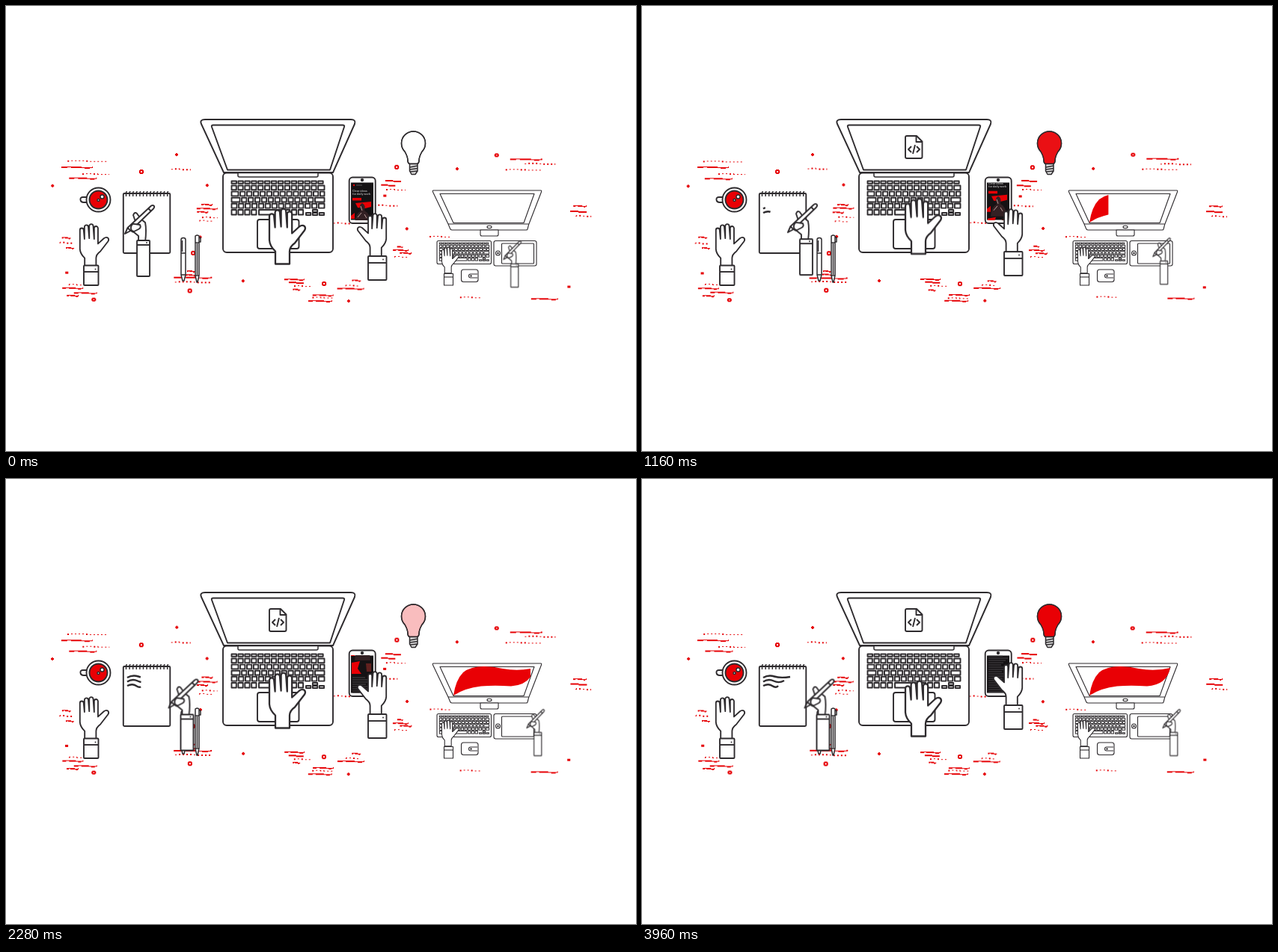
Recreate the animation shown at these times as an HTML page. Size 842 by 596 pixels, loop 4 s.

```html
<!DOCTYPE html>
<html lang="en">
<head>
<meta charset="utf-8">
<title>Busy desk</title>
<style>
html, body { margin: 0; width: 100%; height: 100%; overflow: hidden; background: #fff; }
svg { display: block; width: 842px; height: 596px; }
.ink { fill: #fff; stroke: #2e2b2e; stroke-width: 1.9; stroke-linejoin: round; }
.bold { stroke-width: 2.3; }
.thin { stroke-width: 1.1; }
.fine { stroke-width: 1.5; }
.line { fill: none; }
.dark { fill: #2e2b2e; stroke: none; }
.red { fill: #e90005; stroke: none; }
.mark { fill: none; stroke: #e60005; stroke-width: 1.9; shape-rendering: crispEdges; animation: wobble .8s linear infinite; }
.dots { stroke-width: 1.5; stroke-dasharray: 2 3; }
.spot { fill: #e60005; stroke: none; }

.move { animation: 4s linear infinite; }
.typing { animation-name: typing; }
.writing { animation-name: writing; }
.swiping { animation-name: swiping; }
.drawing { animation-name: drawing; }
.page { animation-name: page; }
.glow { animation-name: glow; }
.icon { animation-name: icon; }
.reveal { animation-name: reveal; }
.note { fill: none; stroke: #2e2b2e; stroke-width: 2.4; stroke-dasharray: 1 2; }
.note1 { animation-name: note1; }
.note2 { animation-name: note2; }
.note3 { animation-name: note3; }

@keyframes wobble {
  0%, 100% { transform: translate(0, 0); }
  30% { transform: translate(.4px, -.5px); }
  65% { transform: translate(-.4px, .5px); }
}
@keyframes typing {
  0%, 100% { transform: translateY(0); }
  22% { transform: translateY(-9px); }
  35%, 45% { transform: translateY(-17.5px); }
  57% { transform: translateY(-12px); }
  73% { transform: translateY(-3px); }
  99% { transform: translateY(-1px); }
}
@keyframes writing {
  0% { transform: translate(0, 0); }
  22% { transform: translate(27px, -4px); }
  35% { transform: translate(43.5px, 0); }
  45% { transform: translate(55px, -4px); }
  48%, 100% { transform: translate(58.5px, 1.5px); }
}
@keyframes swiping {
  0%, 22% { transform: translateY(0); }
  35% { transform: translateY(-11px); }
  45% { transform: translateY(-19px); }
  57% { transform: translateY(-20px); }
  73% { transform: translateY(-25px); }
  99%, 100% { transform: translateY(-32px); }
}
@keyframes drawing {
  0% { transform: translate(0, 0); }
  22% { transform: translate(9.5px, -5px); }
  35% { transform: translate(25px, -3px); }
  45%, 100% { transform: translate(31px, -6px); }
}
@keyframes page {
  0%, 22% { transform: translateY(0); }
  35% { transform: translateY(-17px); }
  45% { transform: translateY(-30px); }
  57% { transform: translateY(-48px); }
  73% { transform: translateY(-71px); }
  99%, 100% { transform: translateY(-95px); }
}
@keyframes glow {
  0% { fill-opacity: 0; }
  31%, 40% { fill-opacity: 1; }
  45% { fill-opacity: .8; }
  57% { fill-opacity: .26; }
  65%, 70% { fill-opacity: 0; }
  73% { fill-opacity: .08; }
  99%, 100% { fill-opacity: 1; }
}
@keyframes icon { 0%, 11% { opacity: 0; } 16%, 100% { opacity: 1; } }
@keyframes reveal {
  0%, 19.5% { transform: translateX(-110px); }
  22% { transform: translateX(-103px); }
  35% { transform: translateX(-69px); }
  45% { transform: translateX(-36px); }
  57% { transform: translateX(-7px); }
  60%, 100% { transform: translateX(0); }
}
@keyframes note1 {
  0%, 38% { stroke-dashoffset: 1; }
  45% { stroke-dashoffset: .67; }
  57% { stroke-dashoffset: .49; }
  70%, 100% { stroke-dashoffset: 0; }
}
@keyframes note2 {
  0%, 27% { stroke-dashoffset: 1; }
  35% { stroke-dashoffset: .6; }
  57% { stroke-dashoffset: .34; }
  70%, 100% { stroke-dashoffset: 0; }
}
@keyframes note3 {
  0%, 17% { stroke-dashoffset: 1; }
  22% { stroke-dashoffset: .7; }
  35%, 45% { stroke-dashoffset: .4; }
  57% { stroke-dashoffset: .1; }
  66%, 100% { stroke-dashoffset: 0; }
}
</style>
</head>
<body>
<svg viewBox="0 0 842 596">
  <defs>
    <path id="hand" class="ink bold" d="M1 10a3.1 3.1 0 0 1 6.2 0L8.600 25V5a3.2 3.2 0 0 1 6.400 0L16.600 24V3.500a3.3 3.3 0 0 1 6.600 0L24.800 25V7a3.2 3.2 0 0 1 6.400 0V33L41 24Q45 21 48 23.500Q50 26 48 29L35 46Q28 51 28 57V74H9V57Q1.500 50 1 42Z"/>
    <g id="penHand" class="ink">
      <path d="M18 11V3L12-2Q5-4 8-10L14-16 11-25Q13-30 16-27L21-20 27-15Q29-5 27 11Z"/>
      <path d="M0 0L3.500-8 34.500-37Q37-39 38.500-37.500 40-36 38-33.500L7.500-4Z"/>
      <path class="line" d="M3.500-8L7.500-4M31-34L35-30"/>
      <path d="M8-9Q9-14 13-13L20-12Q22-8 18-6L12-3Q7-4 8-9Z"/>
      <rect x="16" y="9" width="17" height="48" rx="1"/>
      <path class="line" d="M16 15H33"/>
      <circle class="dark" cx="29" cy="12" r="1"/>
    </g>
    <path id="keys" class="ink"/>
    <path id="bulb" d="M537 207Q537 202 533 195A16 16 0 1 1 556 195Q552 202 552 207Q552 211 549 211.500H540Q537 211 537 207Z"/>
    <clipPath id="screen"><rect x="461" y="236.500" width="30" height="50"/></clipPath>
    <clipPath id="sweep"><rect class="move reveal" x="597" y="245" width="111" height="50"/></clipPath>
  </defs>

  <g id="marks"></g>

  <!-- cup and notepad -->
  <g class="ink">
    <path d="M110 256H103Q99 256 99.500 259.500 100 263 104 263H110Z"/>
    <circle cx="123.500" cy="259.500" r="16"/>
    <circle cx="123.500" cy="259.500" r="12" style="fill:#e90005"/>
    <circle class="fine" cx="128.500" cy="255.500" r="2.500"/>
    <circle class="fine" cx="123.500" cy="260" r="1.500"/>
    <rect x="156.800" y="251" width="62.500" height="80" rx="1.500"/>
    <path id="spiral" class="line fine"/>
  </g>
  <path class="move note note1" pathLength="1" d="M162 266Q169 262 177 264.500T198 265"/>
  <path class="move note note2" pathLength="1" d="M162 271.500Q169 267 176 270.500T190 270"/>
  <path class="move note note3" pathLength="1" d="M162 277Q169 273.500 174 277T182 277"/>

  <!-- pens -->
  <g class="ink fine">
    <path d="M234 313Q234 310.500 237 310.500T240 313V360L238 368H236L234 360Z"/>
    <path class="line" d="M234 331H240M234 360H240M235.500 314V329"/>
    <path d="M253 308Q255.500 306 258 308V361L256 370H255L253 361Z"/>
    <path class="line" d="M253 317H258M253 361H258M255.500 318V360M258 310H260V316H258"/>
  </g>

  <!-- laptop -->
  <g class="ink">
    <path d="M266 152H461Q468 152 466 158L437 223H291L261 158Q258.500 152 266 152Z"/>
    <path d="M277 159.500H450Q453 159.500 452 162L433 219.500H296L275 162Q274 159.500 277 159.500Z"/>
    <rect x="290" y="223.500" width="147" height="106.500" rx="5"/>
    <path class="fine" d="M310 223.500V227Q310 229 312 229H415Q417 229 417 227V223.500Z"/>
    <use href="#keys"/>
    <rect x="336" y="286" width="55.500" height="39" rx="3"/>
    <g class="move icon">
      <path d="M354 174H367L374.500 181.500V202Q374.500 204 372.500 204H354Q352 204 352 202V176Q352 174 354 174Z"/>
      <path class="line" d="M366.500 174V182H374.500M360 188L356 192 360 196M367 188L371 192 367 196M365 186L362 198"/>
    </g>
  </g>
  <g class="move typing"><use href="#hand" x="351" y="271.500"/></g>

  <!-- phone -->
  <rect class="ink" x="458.700" y="229.500" width="35" height="61.500" rx="4.500"/>
  <circle class="dark" cx="476" cy="233" r="2.200"/>
  <rect fill="#151214" x="461" y="236.500" width="30" height="50"/>
  <g clip-path="url(#screen)">
    <g class="move page">
      <circle class="red" cx="465" cy="240" r="1.200"/>
      <path stroke="#777" stroke-width=".7" d="M468 240H476"/>
      <text x="463" y="248.500" font-family="Roboto, sans-serif" font-size="4" fill="#ddd">Clear ideas<tspan x="463" dy="4">for daily work</tspan></text>
      <path class="red" d="M463 257H475V260.500H463ZM467 264L488 262V269L480 271 470 270ZM461 281L466 277V285H461Z"/>
      <path fill="#332023" d="M466 291Q467 277 474 275Q471 266 476 264 481 266 479 274 487 278 487 291Z"/>
      <path stroke="#bb9d9b" d="M474 268L476 274M470 283L475 277M479 279L482 284"/>
      <path class="red" d="M462 294L473 292 470 302 475 309H462Z"/>
      <path fill="#61211f" d="M481 295H488V306H482Z"/>
      <path id="lines" stroke="#504c4e" stroke-width=".9"/>
    </g>
  </g>

  <!-- bulb -->
  <use href="#bulb" class="ink fine"/>
  <use href="#bulb" class="red move glow"/>
  <use href="#bulb" class="ink fine line"/>
  <path class="ink fine" style="fill:#ddd" d="M539.500 211.500H550V221L547 225.500H542L539.500 221Z"/>
  <path class="ink line fine" d="M539.500 216L550 214M539.500 219L550 217.500M540 222L550 221"/>

  <!-- desktop computer -->
  <g class="ink thin">
    <path d="M571 247H715Q716 247 715.500 249L698.500 293 697 299Q697 300 695 300H596Q594 300 593.500 298L591 292 570.500 249Q570 247 571 247Z"/>
    <path d="M580 251.500H706L692 290.500H598Z"/>
    <path class="line" d="M591 292H698.500"/>
    <ellipse cx="646" cy="296" rx="3" ry="1.700"/>
    <path d="M634 300H658V306Q658 308 656 308H636Q634 308 634 306Z"/>
    <rect x="576" y="314.500" width="72.500" height="31" rx="2"/>
    <use href="#keys" transform="translate(418 191.500) scale(.535)"/>
    <rect x="652" y="314.500" width="57" height="33.500" rx="2.500"/>
    <rect x="662.500" y="318" width="43" height="27" rx="1"/>
    <circle cx="657.500" cy="331" r="3"/>
    <circle class="dark" cx="657.500" cy="331" r="1.300"/>
    <rect x="608.500" y="353" width="22.500" height="16.500" rx="3"/>
    <path d="M630 359H621Q618.500 359 618.500 361.500T621 364H630"/>
    <circle class="dark" cx="621.500" cy="361.500" r="1.200"/>
  </g>
  <path class="red" clip-path="url(#sweep)" d="M598 290Q601 269 611 259 621 251 639 251 651 251 664 254 685 258 706 253 701 276 675 277.500 653 276 635 277.500 613 280 598 290Z"/>

  <!-- hands -->
  <use href="#hand" transform="translate(98 292) scale(.8)"/>
  <g class="ink">
    <rect x="104" y="347.500" width="19.500" height="26.500" rx="1"/>
    <path class="line" d="M104 356H123.500"/>
    <circle class="dark" cx="119.500" cy="352.500" r=".9"/>
  </g>
  <g class="move writing"><use href="#penHand" x="159" y="305"/></g>
  <g class="move swiping">
    <use href="#hand" transform="translate(509 278) scale(-.8 .8)"/>
    <g class="ink">
      <rect x="484" y="335" width="24.500" height="32" rx="1"/>
      <path class="line" d="M484 344H508.500"/>
      <circle class="dark" cx="504" cy="339.500" r=".9"/>
    </g>
  </g>
  <use href="#hand" transform="translate(582 323) scale(.47)"/>
  <g class="ink thin">
    <rect x="585.500" y="358.500" width="12" height="15.500"/>
    <path class="line" d="M585.500 363H597.500"/>
  </g>
  <g class="move drawing"><use href="#penHand" transform="translate(665 339.500) scale(.6 .65)"/></g>
</svg>

<script>
const marks = document.getElementById('marks');
let count = 0;

function addMark(tag, attrs, kind = '') {
  const el = document.createElementNS('http://www.w3.org/2000/svg', tag);
  for (const name in attrs) el.setAttribute(name, attrs[name]);
  el.setAttribute('class', 'mark ' + kind);
  el.style.animationDelay = -(count++ * 7 % 20) * 40 + 'ms';
  marks.append(el);
}

// Each row: start x, start y, length.
const rows = text => text.split(',').map(row => row.trim().split(' ').map(Number));

function addLines(text, kind) {
  for (const [x, y, w] of rows(text))
    addMark('path', { d: `M${x} ${y}q${w / 4}-1 ${w / 2} 0t${w / 2} .4` }, kind);
}

addLines(`74 216 42, 84 231 37, 75 310 12, 80 324 11, 75 378 28, 91 384 31, 81 388 16,
  261 266 15, 255 271 28, 255 276 15, 242 355 11, 240 360 14, 224 364 51,
  372 366 27, 378 370.5 20, 383 380 10, 410 387 28, 404 395 32, 462 368 12, 443 378 36,
  507 234.5 21, 501 240.5 19, 523 322 8, 517 327 21, 526 331 16,
  674 205 43, 758 268 18, 754 275.5 22, 702 392 36`, '');
addLines(`82 208 53, 102 225 36, 221 218.5 26, 71 317.5 17, 84 373 19, 262 283 21, 258 288 18,
  226 369.5 50, 385 375 23, 409 391 27, 454 374 20, 508 246 26, 492 267.5 31, 438 290.5 24,
  519 336 18, 693 211.5 41, 668 219 47, 761 281.5 21, 566 309 30, 607 390 30`, 'dots');

for (const [cx, cy] of rows(`62 241, 228 199, 269 240, 81 357.5, 317 368, 458 395,
  506 254.5, 536 298, 603 218, 752 376.5, 260 309`))
  addMark('circle', { cx, cy, r: 1.9 }, 'spot');
for (const [cx, cy] of rows('181 222, 117 393.5, 246 381, 425 372, 522 216, 656 199.5, 250 331'))
  addMark('circle', { cx, cy, r: 2.1 });

const setPath = (id, d) => document.getElementById(id).setAttribute('d', d);
const key = (x, y, w, h) => `M${x} ${y}h${w}v${h}h${-w}z`;

function keyboard() {
  const right = 425.5, pitch = 8.9;
  let d = '';
  for (let i = 0; i < 14; i++) d += key(301.5 + i * pitch, 234.5, 6.5, 3.2);
  [6.3, 9, 11, 7].forEach((first, row) => {
    const y = 240.5 + row * 8.1;
    let x = 301.5, w = first;
    while (x < right - 3) {
      d += key(x, y, w, 5.8);
      x += w + 2.6;
      w = right - x < 14 ? right - x : 6.3;
    }
  });
  for (let i = 0; i < 4; i++) d += key(301.5 + i * pitch, 273, 6.3, 6.5);
  d += key(338, 273, 32, 6.5);
  for (let i = 0; i < 3; i++) d += key(373 + i * pitch, 273, 6.3, 6.5);
  for (let i = 0; i < 3; i++) d += key(401 + i * pitch, 277, 6.3, 3);
  return d + key(409.9, 273, 6.3, 3);
}

setPath('keys', keyboard());
setPath('spiral', Array.from({ length: 13 }, (_, i) => `M${160.5 + i * 4.6} 255v-5q0-2 1.5-1`).join(''));
setPath('lines', Array.from({ length: 24 }, (_, i) => `M463 ${314 + i * 3}h${17 + i * 7 % 10}`).join(''));
</script>
</body>
</html>
```
